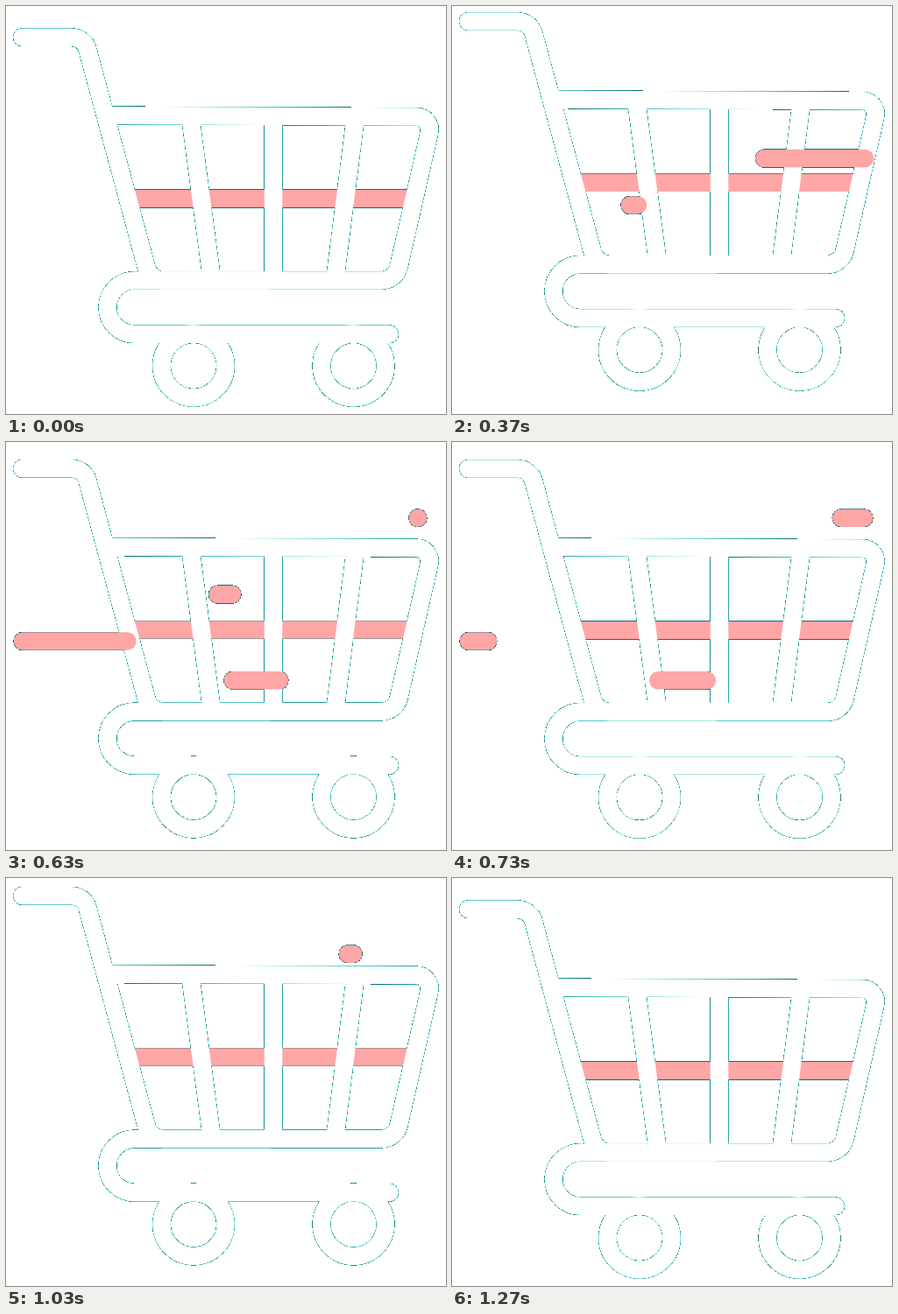
An HTML page with a canvas for the animation above (1.67 s loop, 502 px wide and 466 px high).

```html
<!DOCTYPE html>
<html lang="en">
<head>
<meta charset="utf-8">
<title>Shopping cart</title>
<style>
html, body { margin: 0; width: 100%; height: 100%; overflow: hidden; background: #fff; }
canvas { display: block; }
</style>
</head>
<body>
<canvas id="stage" width="502" height="466"></canvas>
<script>
const LOOP = 1670, START = 270, STEP = 100 / 3, LAST = 30;
const PINK = '#ffa6a6', WHITE = '#fff';
const canvas = document.getElementById('stage');
const ctx = canvas.getContext('2d', { willReadFrequently: true });

// Vertical cart offset: [ms, px]
const HOPS = [[237, 0], [370, -18.29], [403, -21], [536.7, -7.63], [636.7, -5.46],
  [725, -5], [836.7, -13.46], [925, -20.5], [1036.7, -15.46], [1270, 0]];

// Speed lines: the head runs from one x to the other, then the tail follows
const DASHES = [
  { y: 173.9, from: 471, to: 241.5, head: 245, tail: 430, span: 250 },
  { y: 227.4, from: 212, to: 19, head: 331, tail: 518, span: 280 },
  { y: 272.2, from: 312, to: 235, head: 455, tail: 635, span: 290 },
  { y: 86.7, from: 470, to: 390, head: 625, tail: 799, span: 290 }
];

const slope = i => {
  const [a, b] = [HOPS[i], HOPS[i + 1]];
  return a && b ? (b[1] - a[1]) / (b[0] - a[0]) : 0;
};

// Harmonic mean keeps the curve from overshooting its keys
const tangent = i => {
  const a = slope(i - 1), b = slope(i);
  return a * b > 0 ? 2 * a * b / (a + b) : 0;
};

function hop(t) {
  const i = HOPS.findIndex(key => key[0] > t) - 1;
  if (i < 0) return 0;
  const [t0, y0] = HOPS[i], [t1, y1] = HOPS[i + 1];
  const d = t1 - t0, p = (t - t0) / d, q = 1 - p;
  return y0 * (1 + 2 * p) * q * q + y1 * (3 - 2 * p) * p * p
    + d * p * q * (tangent(i) * q - tangent(i + 1) * p);
}

const ease = p => (1 - Math.cos(Math.PI * Math.min(1, Math.max(0, p)))) / 2;

function stroke(color, build) {
  ctx.strokeStyle = color;
  ctx.beginPath();
  build();
  ctx.stroke();
}

const line = (color, x0, y0, x1, y1) => stroke(color, () => {
  ctx.moveTo(x0, y0);
  ctx.lineTo(x1, y1);
});

function drawCart() {
  line(PINK, 148, 220.05, 457, 220.05);

  // Handle and left post
  stroke(WHITE, () => {
    ctx.moveTo(18.4, 35.77);
    ctx.arcTo(89.3, 35.77, 164.2, 313.43, 19);
    ctx.arcTo(164.2, 313.43, 300, 313.43, 20);
    ctx.lineTo(300, 313.43);
  });

  // Rim, right post, base and lower bar
  stroke(WHITE, () => {
    ctx.moveTo(116, 125.1);
    ctx.arcTo(487, 126.66, 444.5, 313.43, 15);
    ctx.arcTo(444.5, 313.43, 146.5, 313.43, 20);
    ctx.lineTo(146.5, 313.43);
    ctx.arc(146.5, 344.1, 30.67, -Math.PI / 2, Math.PI / 2, true);
    ctx.lineTo(437.6, 374.77);
  });

  line(WHITE, 210.5, 128, 234.7, 311);
  line(WHITE, 305.05, 128, 305.05, 311);
  line(WHITE, 398.7, 128, 375.5, 311);
  for (const x of [214, 396.5])
    stroke(WHITE, () => ctx.arc(x, 411, 36.5, 0, 2 * Math.PI));
}

function drawDash({ y, from, to, head, tail, span }, t) {
  if (t <= head || t >= tail + span) return;
  const at = start => from + (to - from) * ease((t - start) / span);
  line(PINK, at(head), y, at(tail) + 0.01, y);
}

// Partly covered edge pixels become an opaque teal fringe
function tintEdges() {
  const image = ctx.getImageData(0, 0, canvas.width, canvas.height);
  const px = image.data;
  for (let i = 0; i < px.length; i += 4) {
    const a = px[i + 3] / 255;
    if (a === 0 || a === 1) continue;
    px[i] *= a ** 1.5;
    px[i + 1] *= a ** 0.35;
    px[i + 2] *= a ** 0.35;
    px[i + 3] = a < 0.07 ? 0 : 255;
  }
  ctx.putImageData(image, 0, 0);
}

function draw(now) {
  const ticks = Math.floor(now % LOOP / 10);
  const step = Math.ceil((ticks - START / 10 + 1) * 3 / 10) - 1;
  const t = START + STEP * Math.min(LAST, Math.max(-1, step));

  ctx.clearRect(0, 0, canvas.width, canvas.height);
  ctx.lineWidth = 20.5;
  ctx.lineCap = 'round';
  ctx.save();
  ctx.translate(0, hop(t));
  drawCart();
  ctx.restore();
  DASHES.forEach(dash => drawDash(dash, t));
  tintEdges();
}

const begin = performance.now();
function tick() {
  draw(performance.now() - begin);
  requestAnimationFrame(tick);
}
tick();
</script>
</body>
</html>
```
